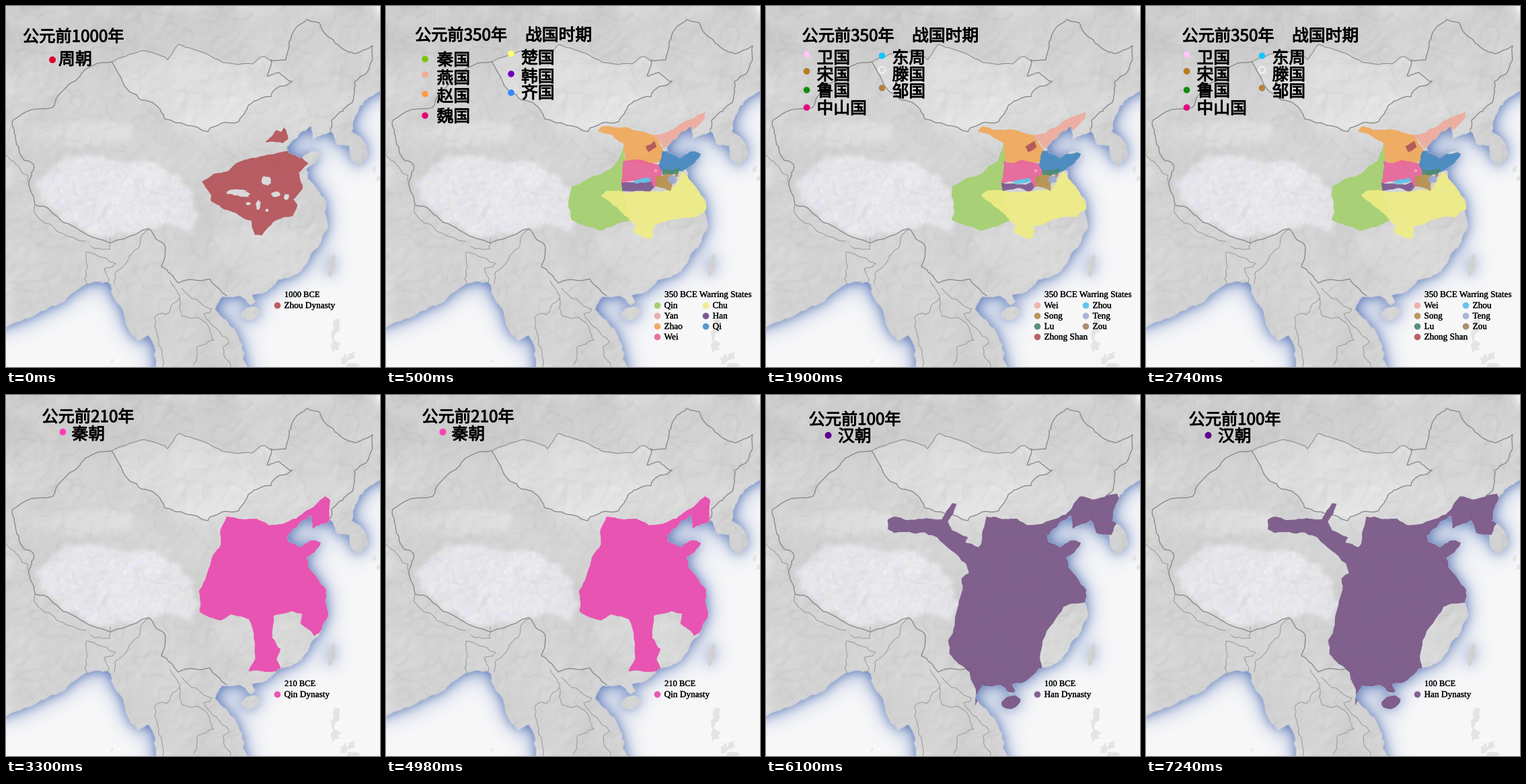
Recreate the animation shown at these times as a matplotlib script. Size 556 by 537 pixels, loop 8000 ms.

```python
import numpy as np
import matplotlib.pyplot as plt
from matplotlib.animation import FuncAnimation
from matplotlib.patches import Circle, Polygon
from matplotlib.path import Path
from matplotlib.patheffects import withStroke

W, H, DPI = 556, 537, 100
STEP, LOOP = 100, 8000
CHANGES = [500, 1900, 3300, 6100]
PX = 72 / DPI
rng = np.random.default_rng(7)

fig = plt.figure(figsize=(W / DPI, H / DPI), dpi=DPI)
ax = fig.add_axes([0, 0, 1, 1])
ax.axis("off")


def rough(flat, amount=0.07, closed=False, depth=3):
    """Turn a few corner points into a slightly ragged line."""
    p = np.array(flat, float).reshape(-1, 2)
    if closed:
        p = np.vstack([p, p[:1]])
    for _ in range(depth):
        d = np.diff(p, axis=0)
        side = np.column_stack([-d[:, 1], d[:, 0]])
        mid = (p[:-1] + p[1:]) / 2 + side * rng.normal(0, amount, (len(d), 1))
        out = np.empty((len(p) + len(mid), 2))
        out[::2], out[1::2] = p, mid
        p = out
    return p


def blob(x, y, rx, ry, tilt=0, jitter=0.12):
    """Ragged ellipse; tilt shears it sideways towards the top."""
    a = np.linspace(0, 2 * np.pi, 14, endpoint=False)
    r = 1 + rng.normal(0, jitter, a.size)
    return np.column_stack([x + r * (rx * np.cos(a) - tilt * np.sin(a)),
                            y + r * ry * np.sin(a)])


# ---- coastlines -------------------------------------------------------
east_coast = rough([
    556, 127, 540, 136, 526, 149, 516, 172, 514, 187, 530, 198, 539, 221, 523, 240,
    512, 226, 510, 208, 491, 205, 483, 186, 456, 199, 454, 179, 438, 188, 418, 209,
    420, 219, 437, 227, 451, 217, 468, 220, 446, 243, 449, 256, 476, 290, 474, 305])
south_coast = rough([
    479, 325, 464, 360, 446, 385, 424, 403, 405, 407, 399, 415, 366, 430, 371, 440,
    364, 445, 350, 432, 322, 432, 311, 451, 342, 485, 359, 537])
bay_coast = rough([
    223, 537, 212, 490, 196, 499, 170, 447, 152, 411, 118, 414, 74, 446, 45, 459, 0, 478])
mainland = np.vstack([[(-20, -20), (580, -20), (580, 120)], east_coast, south_coast,
                      [(359, 560), (223, 560)], bay_coast, [(-20, 485)]])
hainan = blob(364, 457, 14, 10, 3, 0.06)
taiwan = blob(484, 386, 5, 17, 3, 0.06)

# ---- borders ----------------------------------------------------------
west_border = rough([
    157, 83, 118, 94, 92, 118, 69, 151, 10, 170, 14, 195, 20, 218, 41, 236, 34, 267,
    43, 296, 85, 322, 135, 346, 212, 331, 237, 358, 231, 388, 256, 412, 303, 406, 328, 431])
mongol_south = rough([
    157, 83, 184, 128, 222, 147, 236, 168, 300, 187, 346, 172, 361, 147, 394, 135, 425, 112])
mongol_north = rough([
    157, 83, 200, 67, 240, 80, 257, 57, 300, 72, 345, 87, 384, 75, 394, 82])
north_east = rough([
    425, 112, 406, 99, 388, 104, 394, 80, 416, 80, 424, 45, 447, 20, 466, 25, 489, 55,
    518, 71, 545, 59, 535, 101, 518, 113, 518, 130, 505, 151, 484, 170, 482, 184])

# ---- relief map -------------------------------------------------------
yy, xx = np.mgrid[:H, :W] + 0.5
pixels = np.column_stack([xx.ravel(), yy.ravel()])


def blur(a, sigma, pad=60):
    a = np.pad(a, pad, mode="edge")
    fy, fx = np.fft.fftfreq(a.shape[0])[:, None], np.fft.rfftfreq(a.shape[1])
    gain = np.exp(-2 * (np.pi * sigma) ** 2 * (fx ** 2 + fy ** 2))
    return np.fft.irfft2(np.fft.rfft2(a) * gain, a.shape)[pad:-pad, pad:-pad]


def mask(points):
    return Path(points).contains_points(pixels).reshape(H, W).astype(float)


def noise(sigma):
    n = blur(rng.normal(size=(H, W)), sigma)
    return n / n.std()


plateau = mask(rough([38, 262, 88, 224, 165, 232, 278, 275, 275, 338, 235, 322,
                      150, 343, 60, 298], 0.1, True))
tone = 211 + 19 * blur(plateau, 3)
tone += 10 * blur(mask(np.vstack([mongol_north, mongol_south[::-1]])), 2)
tone += 9 * blur(mask(blob(115, 190, 90, 20)), 5)
tone -= 5 * blur(mask(blob(160, 25, 230, 55)), 9)
tone += 7 * blur(mask(blob(405, 165, 150, 38, 45)), 8)
tone += 7 * blur(mask(blob(390, 365, 75, 45)), 9)
dy, dx = np.gradient(noise(4))
tone += 6 * (dx + dy) + 2 * noise(14)
tone -= 6 * np.exp(-(noise(9) / 0.12) ** 2)
speckle = plateau * noise(1.5)
land_rgb = np.stack([tone + 2 * speckle, tone + 2 * speckle,
                     tone + 1 + 4 * np.abs(speckle)], axis=-1)

land = np.clip(mask(mainland) + mask(hainan) + mask(taiwan), 0, 1)
glow = np.clip(0.75 * blur(land, 18) + 0.85 * blur(land, 9), 0, 1)[..., None]
sea_rgb = np.array([248, 248, 249]) * (1 - glow) + np.array([128, 151, 200]) * glow
edge = blur(land, 0.6)[..., None]
picture = np.clip(land_rgb * edge + sea_rgb * (1 - edge), 0, 255).astype(np.uint8)
ax.imshow(picture, extent=(0, W, H, 0), interpolation="nearest")
ax.set(xlim=(0, W), ylim=(H, 0), aspect="auto")


def stroke(line, width=1.4, color="#8b8b8b"):
    ax.plot(*line.T, color=color, lw=width * PX, solid_joinstyle="round")


def thin(*flat):
    stroke(rough(flat, 0.1), 1, "#999999")


for border in (west_border, mongol_south, north_east):
    stroke(border)
stroke(mongol_north, 1.1)
thin(43, 297, 49, 316, 80, 337, 118, 350)
thin(0, 222, 20, 241, 35, 268)
thin(122, 416, 121, 389, 119, 366, 150, 376, 163, 383, 146, 391, 152, 411)
thin(126, 357, 155, 362, 155, 345)
thin(213, 333, 196, 361, 176, 385, 161, 412)
thin(244, 408, 258, 435, 221, 463, 226, 492, 233, 537)
thin(258, 435, 262, 461, 294, 469, 309, 497, 284, 508, 279, 533)
thin(261, 420, 306, 451, 294, 458, 332, 500, 334, 537)

# Faint far islands
for x, y, rx, ry in [(490, 479, 7, 14), (489, 507, 7, 8), (503, 525, 5, 6), (514, 520, 5, 5),
                     (515, 535, 9, 4), (548, 243, 3, 4), (554, 256, 3, 5), (158, 528, 1.5, 3)]:
    ax.add_patch(Polygon(blob(x, y, rx, ry, 1, 0.25), fc="#e4e4e4", ec="none"))

# ---- scene helpers ----------------------------------------------------
scenes = [[] for _ in range(5)]
land_clip = Path(mainland)


def area(scene, points, color, alpha=0.93):
    patch = ax.add_patch(Polygon(points, fc=color, ec=color, lw=0.4, alpha=alpha, zorder=3))
    patch.set_clip_path(land_clip, ax.transData)
    scenes[scene].append(patch)


def region(scene, flat, color, alpha=0.93):
    area(scene, rough(flat, 0.05, True), color, alpha)


def dot(scene, x, y, color, r=4.8, ring=False):
    style = dict(fc="none", ec=color, lw=1.6) if ring else dict(fc=color, ec="none")
    scenes[scene].append(ax.add_patch(Circle((x, y), r, zorder=5, **style)))


def text(scene, x, y, s, font, size, weight):
    label = ax.text(x, y, s, family=font, fontsize=size * PX, color="black",
                    va="baseline", zorder=6)
    label.set_path_effects([withStroke(linewidth=weight * PX, foreground="black")])
    scenes[scene].append(label)


def han(scene, x, middle, s, size=24.8):
    text(scene, x, middle + 9.2, s, "Noto Sans CJK JP", size, 1.0)


def date(scene, x, middle, year):
    han(scene, x, middle, f"公元前{year}年", 24.2)


def serif(scene, x, base, s, size=13.3):
    text(scene, x, base, s, "Liberation Serif", size, 0.25)


def legend(scene, title, rows, size=12.5):
    """Rows run down the first column, then the second after four."""
    serif(scene, 414, 433, title, size)
    for k, (name, color) in enumerate(rows):
        col, row = divmod(k, 4)
        y = 445.5 + 15.6 * row
        dot(scene, 403.5 + 72 * col, y, color)
        serif(scene, 413.5 + 72 * col, y + 3.8, name)


def key(scene, dot_x, text_x, rows):
    for name, color, dot_y, text_y in rows:
        dot(scene, dot_x, dot_y, color, ring=name == "滕国")
        han(scene, text_x, text_y, name)


# ---- 1000 BCE ---------------------------------------------------------
ZHOU = "#b5545a"
region(0, [292, 261, 330, 246, 355, 229, 384, 223, 420, 216, 437, 223, 449, 234, 435, 248,
           441, 271, 427, 287, 433, 296, 426, 312, 403, 318, 380, 341, 370, 340, 365, 319,
           328, 303, 305, 290, 305, 281], ZHOU)
region(0, [386, 202, 402, 185, 409, 188, 413, 181, 419, 198, 411, 204], ZHOU)
for x, y, rx, ry in [(343, 277, 14, 4), (354, 280, 8, 4), (387, 260, 7, 7), (401, 280, 6, 4),
                     (375, 296, 3, 7), (417, 284, 4, 4), (388, 304, 2, 2), (360, 294, 3, 2)]:
    area(0, blob(x, y, rx, ry), "#dadada", 1)
date(0, 25, 44, 1000)
dot(0, 69, 80, "#e0022f", 5)
han(0, 78, 78, "周朝", 25)
legend(0, "1000 BCE", [("Zhou Dynasty", "#b95c60")])

# ---- 350 BCE, later shapes cover the edges of earlier ones ------------
for k in (1, 2):
    region(k, [355, 203, 345, 230, 320, 250, 277, 268, 276, 318, 318, 334, 364, 318,
               352, 275, 356, 230], "#a5d06f")
    region(k, [350, 263, 397, 261, 400, 268, 392, 276, 352, 275], "#7c5890")
    region(k, [320, 282, 328, 275, 395, 276, 425, 273, 441, 246, 466, 274, 480, 300, 460, 314,
               425, 318, 398, 328, 396, 345, 388, 346, 368, 336, 372, 326, 362, 318, 346, 302],
           "#efec86")
    region(k, [315, 186, 322, 179, 366, 184, 397, 192, 411, 211, 412, 228, 390, 236, 356, 230,
               354, 205, 330, 190], "#f1a95c")
    region(k, [397, 192, 432, 180, 475, 158, 473, 168, 414, 211], "#eeab9d")
    region(k, [386, 209, 399, 201, 402, 210, 390, 217], "#b0565c")
    region(k, [353, 231, 380, 229, 412, 236, 405, 267, 398, 269, 394, 260, 350, 263], "#e8669b")
    region(k, [368, 261, 392, 256, 393, 261, 371, 264], "#5fc3ec")
    region(k, [406, 237, 411, 216, 440, 220, 470, 216, 469, 228, 440, 246, 412, 246], "#4588bf")
    region(k, [401, 253, 426, 247, 423, 275, 402, 268], "#b7924f")
    region(k, [411, 244, 437, 242, 434, 250, 411, 251], "#4b8a74")
    area(k, blob(426, 258, 6, 6), "#9da9cd")
    area(k, blob(432, 252, 2, 2), "#ad8c62")
    area(k, blob(401, 245, 2, 2), "#f0a8b4")

date(1, 43, 42, 350)
han(1, 207, 42, "战国时期")
key(1, 58, 75.5, [("秦国", "#7dc400", 79, 79), ("燕国", "#f3aa93", 102, 106),
                  ("赵国", "#ff9d42", 131, 133), ("魏国", "#e0046f", 163, 163)])
key(1, 186, 201, [("楚国", "#ffff70", 71, 76), ("韩国", "#7100c2", 101, 104),
                  ("齐国", "#3385ff", 129, 128)])
legend(1, "350 BCE Warring States",
       [("Qin", "#a5cf73"), ("Yan", "#e9b0b0"), ("Zhao", "#f0ac66"), ("Wei", "#e7709b"),
        ("Chu", "#efec90"), ("Han", "#7d5a92"), ("Qi", "#5a98cb")], 13.2)

date(2, 53.5, 43, 350)
han(2, 217, 43, "战国时期")
key(2, 60.5, 75.5, [("卫国", "#ffc6f8", 72, 76), ("宋国", "#b97a1c", 97, 101),
                    ("鲁国", "#148c0c", 125, 125), ("中山国", "#e5067d", 151, 151)])
key(2, 172.5, 187.5, [("东周", "#14c6ff", 74, 76), ("滕国", "#f1f1f5", 95, 101),
                      ("邹国", "#b3813f", 122, 126)])
legend(2, "350 BCE Warring States",
       [("Wei", "#efb2a8"), ("Song", "#b9965a"), ("Lu", "#5c8f7c"), ("Zhong Shan", "#bb6065"),
        ("Zhou", "#66c5ec"), ("Teng", "#a9b4d6"), ("Zou", "#ab9070")], 13.2)

# ---- the two empires share their northern edge ------------------------
NORTH = [320, 222, 328, 181, 352, 185, 372, 184, 390, 194, 432, 184, 455, 168]

region(3, NORTH + [474, 151, 482, 157, 481, 188, 470, 225, 450, 240, 480, 280, 482, 322,
                   466, 353, 458, 358, 438, 340, 440, 325, 425, 321, 398, 328, 396, 362,
                   408, 378, 402, 393, 410, 411, 361, 411, 371, 391, 361, 333, 335, 326,
                   320, 335, 288, 322, 287, 292, 299, 267, 306, 243], "#e94fb0", 0.96)
date(3, 53.5, 31, 210)
dot(3, 84.5, 55, "#ff3db4", 5)
han(3, 97.5, 57, "秦朝")
legend(3, "210 BCE", [("Qin Dynasty", "#ea57b1")])

PURPLE = "#7a5788"
region(4, NORTH + [467, 151, 485, 156, 522, 147, 528, 160, 513, 208, 490, 209, 480, 290,
                   475, 308, 442, 315, 411, 365, 412, 412, 374, 445, 325, 440, 311, 461,
                   309, 431, 303, 412, 273, 385, 271, 365, 285, 317, 291, 273, 302, 265,
                   297, 250, 255, 212, 235, 204, 191, 205, 181, 199, 181, 186, 191, 181,
                   215, 186, 262, 185, 277, 161, 283, 162, 270, 188, 276, 201, 300, 212,
                   296, 219, 316, 227], PURPLE)
scenes[4].append(ax.add_patch(Polygon(hainan, fc=PURPLE, ec="none", alpha=0.95, zorder=3)))
date(4, 63.5, 35, 100)
dot(4, 92.5, 60, "#5e0092", 5)
han(4, 107, 60, "汉朝")
legend(4, "100 BCE", [("Han Dynasty", "#856193")])


def update(frame):
    current = np.searchsorted(CHANGES, frame * STEP, side="right")
    for k, artists in enumerate(scenes):
        for artist in artists:
            artist.set_visible(k == current)
    return []


anim = FuncAnimation(fig, update, frames=LOOP // STEP, interval=STEP, repeat=True)
plt.show()
```
